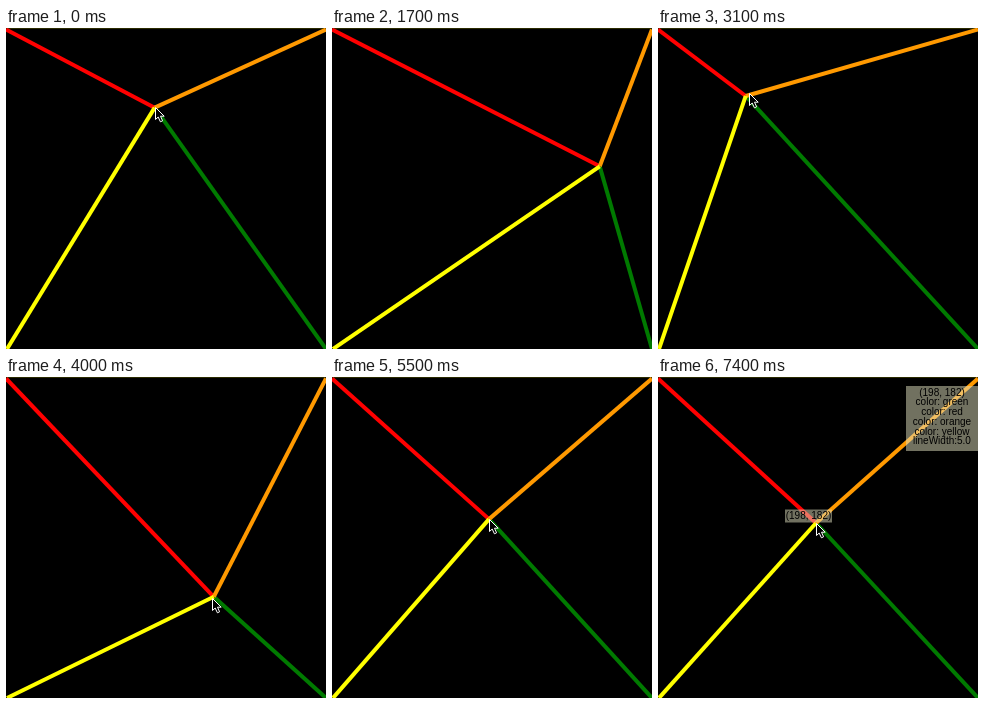
These frames come from a looping animation (320x321 px, 7500 ms). An HTML page with a canvas:

```html
<!DOCTYPE html>
<html>
<head>
<meta charset="utf-8">
<style>
html, body { margin: 0; width: 100%; height: 100%; overflow: hidden; background: #000; }
canvas { display: block; }
</style>
</head>
<body>
<canvas width="320" height="321"></canvas>
<script>
const ctx = document.querySelector('canvas').getContext('2d');
const W = 320, H = 321, LOOP = 7500, STEP = 100;
const CX = 158, CY = 146;          // the spiral closes in on this point
const REST = 1400, RESUME = 1700;  // pause without a pointer
const INFO = 7100, LEAD = 12;      // labels appear; the pointer runs ahead

// Clockwise spiral: time, angle in degrees, radius
const spiral = [
  { t: 0, angle: -98, r: 67 },
  { t: RESUME, angle: -4, r: 110 },
  { t: 3100, angle: 228, r: 105 },
  { t: 4000, angle: 416, r: 89 },
  { t: 4900, angle: 534, r: 58 },
  { t: 5500, angle: 616, r: 4 },
  { t: INFO, angle: 900, r: 0 }
];
const corners = [
  ['#007a00', W, H],
  ['#ff0000', 0, 1.5],
  ['#ff9900', W, 1.5],
  ['#ffff00', 1, H]
];
const place = '(198, 182)';
const colors = ['green', 'red', 'orange', 'yellow'].map(c => 'color: ' + c);

function position(t) {
  if (t > REST && t < RESUME) t = REST;
  const n = spiral.findIndex(k => k.t > t);
  if (n < 0) return [CX, CY];
  const a = spiral[n - 1], b = spiral[n], u = (t - a.t) / (b.t - a.t);
  const angle = (a.angle + (b.angle - a.angle) * u) * Math.PI / 180;
  const r = a.r + (b.r - a.r) * u;
  return [CX + r * Math.cos(angle), CY + r * Math.sin(angle)];
}

function box(x, y, w, h, lines) {
  ctx.fillStyle = 'rgba(226, 226, 192, 0.5)';
  ctx.fillRect(x, y, w, h);
  ctx.fillStyle = '#000';
  ctx.font = '10px "Liberation Sans", Arial, sans-serif';
  ctx.textAlign = 'center';
  lines.forEach((s, i) => ctx.fillText(s, x + w / 2, y + 9.7 * (i + 1)));
}

function pointer(x, y) {
  const shape = new Path2D('M.5 .5V12.5L3.2 10L5.4 14.8L7.6 13.8L5.5 9.2H9.2Z');
  ctx.save();
  ctx.translate(x, y);
  ctx.fillStyle = '#000';
  ctx.fill(shape);
  ctx.strokeStyle = '#fff';
  ctx.lineWidth = 1;
  ctx.stroke(shape);
  ctx.restore();
}

function draw(t) {
  const [x, y] = position(t);
  ctx.fillStyle = '#000';
  ctx.fillRect(0, 0, W, H);
  ctx.fillStyle = '#2b2b00';
  ctx.fillRect(0, 0, W, 1);
  ctx.lineWidth = 4;
  for (const [color, cx, cy] of corners) {
    ctx.strokeStyle = color;
    ctx.beginPath();
    ctx.moveTo(cx, cy);
    ctx.lineTo(x, y);
    ctx.stroke();
  }
  if (t >= INFO) {
    box(248, 9, 72, 65, [place, ...colors, 'lineWidth:5.0']);
    box(127, 132.5, 47, 13, [place]);
  }
  if (t < REST || t > RESUME) pointer(...position(t + LEAD).map(Math.round));
}

const start = performance.now();
function frame() {
  const t = (performance.now() - start) % LOOP;
  draw(Math.floor(t / STEP) * STEP);
  requestAnimationFrame(frame);
}
frame();
</script>
</body>
</html>
```
